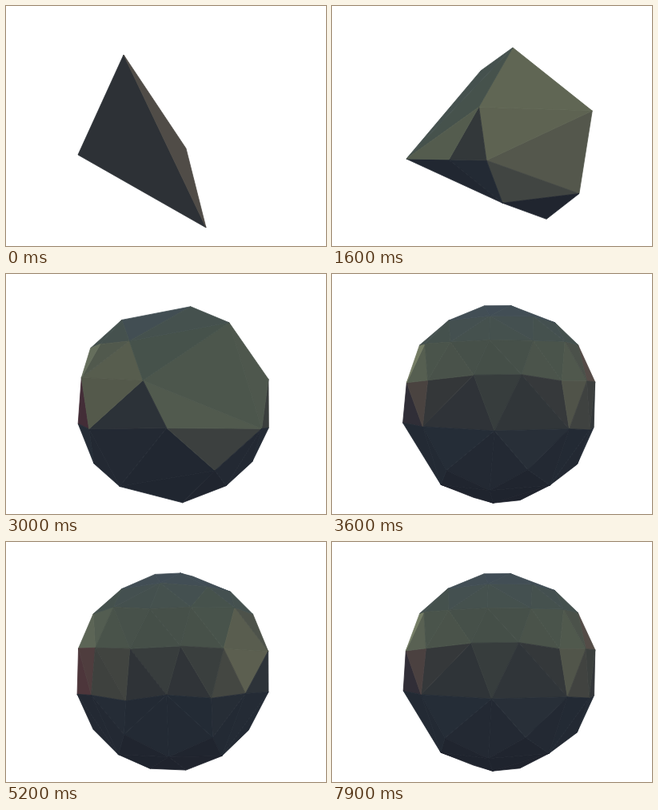
Animation, 400 px wide and 300 px high, one loop 8 s. Source, as an HTML page with a canvas:

```html
<!DOCTYPE html>
<html lang="en">
<head>
<meta charset="utf-8">
<title>Growing polyhedron</title>
<style>
  html, body { margin: 0; width: 100%; height: 100%; overflow: hidden; background: #fff; }
  canvas { display: block; width: 400px; height: 300px; }
</style>
</head>
<body>
<canvas id="stage" width="400" height="300"></canvas>
<script>
const ctx = document.getElementById('stage').getContext('2d');

const STEP = 100, STEPS = 80;
const DEG = Math.PI / 180;
const TURN = 8.34 * DEG;             // rotation per step
const ROUGH = 9, BLOCK = 25, BALL = 36;   // steps at which each stage is complete
const CX = 208, CY = 162.5, LIMB = 124, CAM = 6;
const FOCAL = LIMB * Math.sqrt(CAM * CAM - 1);

const dot = (a, b) => a[0] * b[0] + a[1] * b[1] + a[2] * b[2];
const sub = (a, b) => [a[0] - b[0], a[1] - b[1], a[2] - b[2]];
const cross = (a, b) => [
  a[1] * b[2] - a[2] * b[1], a[2] * b[0] - a[0] * b[2], a[0] * b[1] - a[1] * b[0]];
const unit = a => { const l = Math.hypot(...a) || 1; return a.map(c => c / l); };
const near = (a, b, angle) => dot(a, b) > Math.cos(angle);

function randomizer(seed) {
  return () => (seed = (seed * 16807) % 2147483647) / 2147483647;
}
const random = randomizer(4242);

function spin([x, y, z], a) {
  const c = Math.cos(a), s = Math.sin(a);
  return [x * c + z * s, y, z * c - x * s];
}

function project([x, y, z]) {
  const s = FOCAL / (CAM - z);
  return [CX + x * s, CY - y * s];
}

// Puts a stage position on the unit sphere; side -1 picks the far half.
function lift(x, y, side) {
  const u = (x - CX) / FOCAL, v = (CY - y) / FOCAL;
  const q = 1 + u * u + v * v;
  const root = Math.sqrt(Math.max(0, CAM * CAM - q * (CAM * CAM - 1)));
  const t = (CAM - side * root) / q;
  return unit([u * t, v * t, CAM - t]);
}

// Corners placed at one step, turned back to the resting pose.
function corners(step, front, back) {
  const place = side => ([x, y]) => spin(lift(x, y, side), -step * TURN);
  return [...front.map(place(1)), ...back.map(place(-1))];
}

const seed = corners(0, [[147, 61], [90, 186], [250, 277]], [[225, 178]]);
const rough = corners(ROUGH,
  [[284, 126], [92, 190], [155, 55], [252, 275], [120, 241], [250, 243], [91, 130], [309, 146]],
  [[258, 79], [87, 188]]);
const extra = corners(BLOCK,
  [[237, 194], [113, 191], [233, 56], [208, 281]], [[113, 133]]);

// A run of evenly spaced corners along one latitude, slightly shaken.
function ring(lat, start, gap, count) {
  return Array.from({ length: count }, (_, i) => {
    const a = (start + gap * i + 4 * random() - 2) * DEG;
    const b = (lat + 4 * random() - 2) * DEG;
    return [Math.sin(a) * Math.cos(b), Math.sin(b), Math.cos(a) * Math.cos(b)];
  });
}

const ball = [
  ...ring(76, 20, 72, 5),
  ...ring(54, 5, 45, 8),
  ...ring(35, -26, 27, 13),
  ...ring(13, -3, 24.4, 14),
  ...ring(-13, 15, 43.5, 2),
  ...ring(-13, 102, 22.8, 11),
  ...ring(-36, 22, 58, 6),
  ...ring(-52, 51, 58, 6),
  ...ring(-76, 45, 90, 4),
].map(p => [random(), p]).sort((a, b) => a[0] - b[0]).map(e => e[1]);

function grow(old, next, k, from, to) {
  const added = next.slice(0, Math.ceil(next.length * (k - from) / (to - from)));
  if (k >= to) return added;
  return [...old.filter(p => !added.some(n => near(n, p, 0.45))), ...added];
}

function cloud(k) {
  if (k <= ROUGH) return grow(seed, rough, k, 0, ROUGH);
  if (k <= BLOCK) {
    const share = (k - ROUGH) / (BLOCK - ROUGH);
    return [...rough, ...extra.slice(0, Math.round(extra.length * share))];
  }
  return grow([...rough, ...extra], ball, k, BLOCK, BALL);
}

function hull(pts) {
  const faces = [], n = pts.length;
  for (let i = 0; i < n; i++)
    for (let j = i + 1; j < n; j++)
      for (let k = j + 1; k < n; k++) {
        let normal = unit(cross(sub(pts[j], pts[i]), sub(pts[k], pts[i])));
        const level = dot(normal, pts[i]);
        let above = false, below = false;
        for (let m = 0; m < n && !(above && below); m++) {
          if (m === i || m === j || m === k) continue;
          const d = dot(normal, pts[m]) - level;
          if (d > 1e-9) above = true; else if (d < -1e-9) below = true;
        }
        if (above && below) continue;
        if (above) normal = normal.map(c => -c);
        faces.push({ tips: [pts[i], pts[j], pts[k]], normal });
      }
  return faces;
}

// Colour by height of the normal, plus coloured lights: x, y, spread, r, g, b.
const RAMP = [
  [-1, 30, 34, 44], [-0.3, 37, 45, 55], [-0.05, 45, 49, 54],
  [0.2, 69, 77, 70], [0.6, 70, 82, 75], [1, 64, 76, 88]];
const LIGHTS = [
  [0.62, 0.08, 0.07, 34, 32, 18],
  [-0.62, 0.12, 0.05, 22, 20, 10],
  [-0.9, 0.38, 0.02, 50, 48, 30],
  [-0.97, 0.02, 0.03, 34, -6, 0],
  [0.95, 0.28, 0.02, 26, -18, -8]];

function shade([x, y]) {
  let i = 1;
  while (i < RAMP.length - 1 && y > RAMP[i][0]) i++;
  const [lo, ...from] = RAMP[i - 1], [hi, ...to] = RAMP[i];
  const t = (y - lo) / (hi - lo);
  const rgb = from.map((c, n) => c + (to[n] - c) * t);
  for (const [lx, ly, spread, ...tint] of LIGHTS) {
    const power = Math.exp(-((x - lx) ** 2 + (y - ly) ** 2) / spread);
    tint.forEach((c, n) => rgb[n] += c * power);
  }
  return `rgb(${rgb.map(Math.round)})`;
}

const solids = Array.from({ length: BALL + 1 }, (_, k) => hull(cloud(k)));

function draw(k) {
  ctx.fillStyle = '#fff';
  ctx.fillRect(0, 0, 400, 300);
  ctx.lineWidth = 0.8;
  ctx.lineJoin = 'round';
  for (const face of solids[Math.min(k, BALL)]) {
    const normal = spin(face.normal, k * TURN);
    const tips = face.tips.map(p => spin(p, k * TURN));
    if (dot(normal, sub([0, 0, CAM], tips[0])) <= 0) continue;
    ctx.beginPath();
    tips.forEach(p => ctx.lineTo(...project(p)));
    ctx.closePath();
    ctx.fillStyle = ctx.strokeStyle = shade(normal);
    ctx.fill();
    ctx.stroke();
  }
}

const start = performance.now();
let shown = -1;
function tick() {
  const k = Math.floor((performance.now() - start) / STEP) % STEPS;
  if (k !== shown) draw(shown = k);
  requestAnimationFrame(tick);
}
tick();
</script>
</body>
</html>
```
